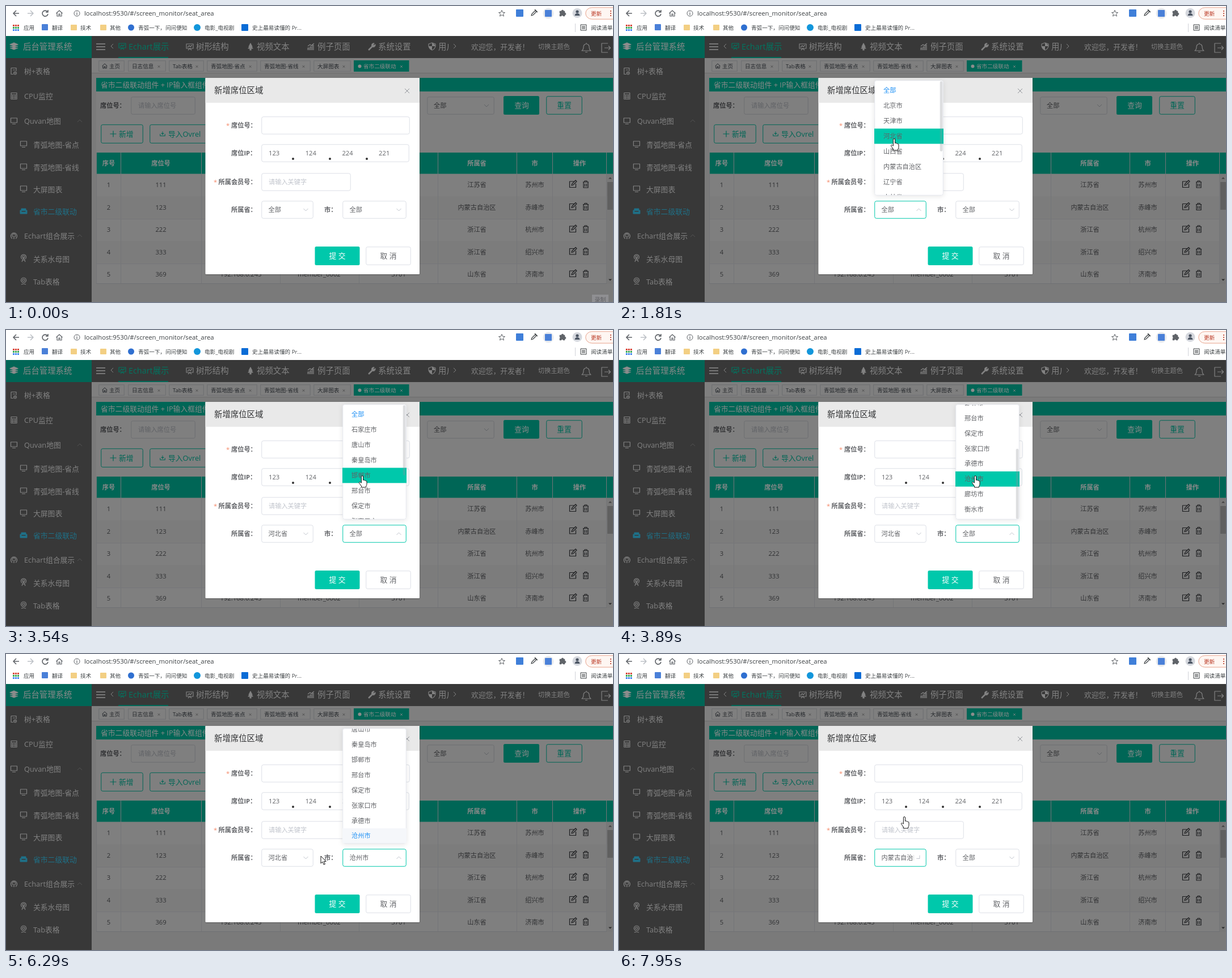
Write an HTML page that moves like this. It is 1070 px wide and 523 px high and loops after 8000 ms.

```html
<!DOCTYPE html>
<html lang="zh-CN">
<head>
<meta charset="utf-8">
<style>
  html, body { margin: 0; width: 100%; height: 100%; overflow: hidden; background: #fff; }
  svg { display: block; width: 100vw; height: 100vh; }
  text { font-family: 'Open Sans', 'Noto Sans CJK SC', 'Noto Sans CJK', sans-serif; white-space: pre; }
</style>
</head>
<body>
<svg viewBox="0 0 1070 523" xmlns="http://www.w3.org/2000/svg">
  <defs>
    <clipPath id="cutNav"><path d="M740 53h40v40h-40z"/></clipPath>
    <clipPath id="cutTable"><path d="M159 259h911v232H159z"/></clipPath>
    <clipPath id="cutValue"><path d="M450 344h69.5v32h-69.5z"/></clipPath>
    <clipPath id="cutList"><path d="M440 132h280v202H440z"/></clipPath>
    <filter id="shadow" x="-20%" y="-20%" width="140%" height="140%">
      <feDropShadow dx="0" dy="1.5" stdDeviation="4" flood-opacity=".1"/>
    </filter>
    <filter id="dialogShadow">
      <feDropShadow dx="0" dy=".8" stdDeviation="1.2" flood-opacity=".3"/>
    </filter>
  </defs>
  <g id="page"></g>
  <g id="live"></g>
</svg>
<script>
const TEAL = '#00c8ab', DIM_TEAL = '#006656', DIM_WHITE = '#7f7f7f', DARK = '#383838',
      INK = '#606266', DIM_INK = '#303133', LINE = '#dcdfe6', DIM_LINE = '#6e6f72';

// Markup helpers
const rect = (x, y, x2, y2, fill, stroke = 'none', r = 0) => {
  const o = stroke === 'none' ? 0 : .75;
  return `<rect x="${x + o}" y="${y + o}" width="${x2 - x - 2 * o}" height="${y2 - y - 2 * o}" rx="${r}" fill="${fill}" stroke="${stroke}"/>`;
};
const text = (x, y, s, size = 11.2, fill = INK, extra = '') =>
  `<text x="${x}" y="${y + size * .37}" font-size="${size}" fill="${fill}" ${extra}>${s}</text>`;
const MID = 'text-anchor="middle" ', BOLD = 'font-weight="700"';
const path = (d, stroke, x = 0, y = 0, width = 1.2, fill = 'none', extra = '') =>
  `<path d="${d}" transform="translate(${x} ${y}) ${extra}" fill="${fill}" stroke="${stroke}" stroke-width="${width}" stroke-linejoin="round"/>`;
const dot = (x, y, r, fill, stroke = 'none') => `<circle cx="${x}" cy="${y}" r="${r}" fill="${fill}" stroke="${stroke}"/>`;
const chevron = (x, y, angle, color) => path('M-4 2L0-2L4 2', color, x, y, 1, 'none', `rotate(${angle})`);
const cross = (x, y, r, color, w = 1) => path(`M${-r} ${-r}L${r} ${r}M${r} ${-r}L${-r} ${r}`, color, x, y, w);

const ICON = {
  screen: 'M-5.5-5h11v8h-11zM-3 5.5h6',
  chart: 'M-6-5h12v8H-6zM-3 6L0 3L3 6M-4 1L-1-2L1 0L4-3',
  tree: 'M-1 6V3H-4L-1 0H-3L0-6L3 0H1L4 3H1V6z',
  bars: 'M-6 6V2h2v4M-2 6V0h2v6M2 6V-3h2v9M-6-1L-2-4L0-2L5-6',
  wrench: 'M-5 6L-6 5L0-1A3.5 3.5 0 0 1 4-6L2-3.5L3.5-2L6-4A3.5 3.5 0 0 1 1 0z',
  shield: 'M0-6L6-4V0Q5 5 0 7Q-5 5-6 0V-4z',
  doc: 'M-5-5.5H4V0M-5-5.5V5.5H-1M-2-2H2M2 1a2.5 2.5 0 1 0 .1 0zM2 2v2h1',
  grid: 'M-5-5.5H5V5.5H-5zM-5-2H5M-5 2H5M-2-2V5M2-2V5',
  radar: 'M-3 5a5.5 5.5 0 1 1 6 0M-1.8 2a3 3 0 1 1 3.6 0M0 0V5M-1 5h2',
  antenna: 'M-3 1a4.5 4.5 0 1 1 6 0M-1-1a2 2 0 1 1 2 0M0-2L-3 6M0-2L3 6M-1.5 3h3',
  webcam: 'M0-6a4.5 4.5 0 1 0 .1 0zM0-3.5a2 2 0 1 0 .1 0zM-4 6Q0 4 4 6',
  home: 'M-5.5 0L0-5L5.5 0M-4-1V5H-1V1H1V5H4V-1',
  edit: 'M3-5H-5.5V5.5H5.5V-1M-2 2L-1-1L5-7L7-5L1 1z',
  trash: 'M-5-4H5M-2-4V-6H2V-4M-4-4V6H4V-4M-1.5-1V4M1.5-1V4',
  download: 'M-5 0V4H5V0M0-5V1M-2.5-1.5L0 1L2.5-1.5',
  bell: 'M-8 5H8Q5 3 5-2A5 5 0 0 0-5-2Q-5 3-8 5zM-2 7.5H2M0-7V-9',
  exit: 'M4-8H-7V8H4M-2 0H8M5-3.5L8.5 0L5 3.5'
};
const icon = (name, x, y, color, fill = 'none', scale = 1) => path(ICON[name], color, x, y, 1.2, fill, `scale(${scale})`);

function browserBar() {
  const g = '#5f6368', b = '#2f6fd0', mark = '#3c4043';
  let s = rect(0, 0, 1070, 53, '#fff');
  s += path('M5 0H-5M0-5L-5 0L0 5', g, 18, 13, 1.6) + path('M-5 0H5M0-5L5 0L0 5', '#bdc1c6', 43, 13, 1.6);
  s += path('M4-3A5 5 0 1 0 5 1M5-6V-2H1', g, 69, 13, 1.6) + icon('home', 94, 13, g);
  s += dot(125, 13, 5, 'none', g) + path('M0-1V3M0-3.2V-2', g, 125, 13);
  s += text(138, 12.5, 'localhost:9530/#/screen_monitor/seat_area', 11.3, mark);
  s += path('M0-5.5L1.6-1.7L5.5-1.5L2.5 1L3.5 5L0 2.8L-3.5 5L-2.5 1L-5.5-1.5L-1.6-1.7z', g, 874, 13, 1);
  s += rect(899, 6, 912, 19, '#3f7fd9', 'none', 1) + path('M-5 5L-4 2L2-4L4-2L-2 4zM1-6L6-1', mark, 931, 12, 1.2);
  s += dot(956, 13, 9.5, '#e8eaed') + rect(950, 7, 962, 19, '#4a80d8', 'none', 1);
  s += path('M-5-3H-2A2 2 0 0 1 2-3H4V0A2 2 0 0 1 4 4V6H1A1.5 1.5 0 0 0-2 6H-5V3A2 2 0 0 0-5 0z', g, 981, 12, .5, g);
  s += dot(1007, 12.5, 8.5, '#d5d8de') + dot(1007, 10, 2.6, '#4b5563') + path('M-4.5 5Q-4 1 0 1T4.5 5z', 'none', 1007, 12, 0, '#4b5563');
  s += rect(1021, 2, 1090, 24, '#fef6f2', '#e8a48e', 11) + text(1031, 13, '更新', 9.6, '#b8341f');
  for (let i = 0; i < 3; i++) s += dot(1066, 9 + 4 * i, 1.1, '#b8341f');
  ['#d94b3f', '#36a852', '#4285f4'].forEach((c, j) => {
    for (let i = 0; i < 3; i++) s += rect(12 + 4 * i, 33 + 4 * j, 15 + 4 * i, 36 + 4 * j, c);
  });
  s += rect(63, 32, 74, 43, '#4a80d8', 'none', 1);
  for (const x of [114, 166]) s += rect(x, 33, x + 11, 43, '#f3cf83', 'none', 1);
  s += dot(220.5, 38, 5.5, b) + dot(337, 38, 6, '#1296db') + rect(415, 32, 427, 44, '#0a6cd6', 'none', 1);
  [[31, '应用'], [81, '翻译'], [131, '技术'], [183, '其他'], [233, '青弧一下，问问便知'], [350, '电影_电视剧'],
   [434, '史上最易读懂的 Pr...'], [1031, '阅读清单']].forEach(([x, label]) => s += text(x, 38, label, 9.6, mark));
  return s + rect(1003, 31, 1004, 46, '#d0d3d8') + path('M-5-5H5V5H-5zM-3-2H3M-3 0H3M-3 2H3', mark, 1018, 38, 1);
}

function sidebar() {
  const c = '#828282', active = '#1f7188';
  let s = rect(0, 53, 151, 523, DARK) + rect(0, 53, 151, 92, DIM_TEAL);
  s += path('M-7-3L0-6L7-3L0 0zM-7 0L0 3L7 0M-7 3L0 6L7 3', '#8c8c8c', 14, 71, 1.3, '#8c8c8c');
  s += text(30, 72, '后台管理系统', 14.4, '#8a8a8a');
  [[115, '树+表格', 'doc'], [159, 'CPU监控', 'grid'], [203, 'Quvan地图', 'screen', 1], [406, 'Echart组合展示', 'radar', 1]]
    .forEach(([y, label, name, caret]) => {
      s += icon(name, 14, y, c) + text(32, y, label, 12.8, c);
      if (caret) s += chevron(130, y, 0, '#525252');
    });
  [[245, '青弧地图-省点', 'screen'], [285, '青弧地图-省线', 'screen'], [324, '大屏图表', 'screen'],
   [447, '关系水母图', 'antenna'], [487, 'Tab表格', 'webcam']]
    .forEach(([y, label, name]) => s += icon(name, 31, y - 1, c) + text(48, y, label, 12.8, c));
  s += path('M-4-1V-5H4V-1M-6-2V4H6V-2H4V1H-4V-2z', active, 31, 363, 1, active);
  return s + text(48, 363, '省市二级联动', 12.8, active);
}

function topBar() {
  const c = '#828282', active = '#007561';
  let s = rect(151, 53, 1070, 92, DARK) + rect(198, 90, 286, 92, DIM_TEAL);
  s += path('M159 67H175M159 72H175M159 77H175', '#8c8c8c', 0, 0, 1.6);
  s += chevron(187, 71, -90, c) + chevron(791, 71, 90, c);
  s += icon('chart', 205, 71, active) + text(216, 72, 'Echart展示', 14.4, active);
  [[324, '树形结构', 'chart'], [431, '视频文本', 'tree', c], [538, '例子页面', 'bars'], [645, '系统设置', 'wrench', c]]
    .forEach(([x, label, name, fill]) => s += icon(name, x, 72, c, fill) + text(x + 11, 72, label, 14.4, c));
  s += icon('shield', 751, 71, c) + path('M0-6V0H6Q5-4 0-6M0 0V7Q-5 5-6 0z', 'none', 751, 71, 0, c);
  s += `<g clip-path="url(#cutNav)">${text(762, 72, '用户', 14.4, c)}</g>`;
  s += text(820, 72, '欢迎您，开发者！', 12.8, c) + text(938, 72, '切换主题色', 11.2, c);
  return s + icon('bell', 1023, 74, c) + icon('exit', 1057, 74, c);
}

function tabs() {
  let s = rect(151, 92, 1070, 118, DIM_WHITE) + rect(151, 118, 1070, 119, '#6c6c6c');
  s += rect(163, 96, 209, 116, DIM_WHITE, DIM_LINE) + icon('home', 174, 106, '#25282c', 'none', .8) + text(182, 106, '主页', 9.6, '#25282c');
  [[215, 282, '日志信息'], [287, 349, 'Tab表格'], [354, 443, '青弧地图-省点'], [448, 537, '青弧地图-省线'], [542, 608, '大屏图表']]
    .forEach(([a, b, label]) => s += rect(a, 96, b, 116, DIM_WHITE, DIM_LINE) + text(a + 7, 106, label, 9.6, '#25282c') + cross(b - 12.5, 107, 1.8, '#444', .8));
  return s + rect(613, 96, 710.5, 116, DIM_TEAL) + dot(623.5, 106.5, 3, '#8c8c8c') + text(630, 106, '省市二级联动', 9.6, '#8c8c8c') + cross(697, 107, 1.8, '#8c8c8c', .8);
}

function content() {
  const cols = [159, 202, 344, 483, 622, 761, 900, 963, 1058];
  const rows = [['111', '江苏省', '苏州市'], ['123', '内蒙古自治区', '赤峰市'], ['222', '浙江省', '杭州市'], ['333', '浙江省', '绍兴市'], ['369', '山东省', '济南市']];
  const outlined = (a, y, b, y2) => rect(a, y, b, y2, DIM_WHITE, DIM_TEAL, 2.5);
  const dimText = (x, y, s, extra = MID) => text(x, y, s, 11.2, DIM_INK, extra);
  let s = rect(151, 119, 1070, 523, '#7a7a7a') + rect(159, 127, 1070, 491, DIM_WHITE) + rect(159, 127, 1070, 151, DIM_TEAL);
  s += text(167, 139, '省市二级联动组件 + IP输入框组件', 12.8, '#8a8a8a') + dimText(166, 176, '席位号：', BOLD);
  s += rect(220, 160, 334, 192, DIM_WHITE, DIM_LINE, 2.5) + text(233, 176, '请输入席位号', 11.2, '#606266');
  s += rect(742, 160, 861, 192, DIM_WHITE, DIM_LINE, 2.5) + dimText(754, 176, '全部', '') + chevron(847, 176, 180, '#606266');
  s += rect(877, 159, 940, 192, DIM_TEAL, 'none', 2.5) + text(909, 175, '查询', 12.8, '#8a8a8a', MID);
  s += outlined(952, 159, 1016, 192) + text(984, 175, '重置', 12.8, DIM_TEAL, MID);
  s += outlined(167, 209, 242, 243) + path('M-5.5 0H5.5M0-5.5V5.5', DIM_TEAL, 189, 226) + text(199, 226, '新增', 12.8, DIM_TEAL);
  s += outlined(253, 209, 360, 243) + icon('download', 276, 226, DIM_TEAL, 'none', .85) + text(286, 226, '导入Ovrel', 12.8, DIM_TEAL);

  s += rect(159, 259, 1070, 296.5, DIM_TEAL);
  [[181, '序号'], [273, '席位号'], [830, '所属省'], [932, '市'], [1011, '操作']]
    .forEach(([x, label]) => s += text(x, 278, label, 11.2, '#8a8a8a', MID + BOLD));
  let body = '';
  rows.forEach(([seat, province, city], i) => {
    const y = 316 + 39.5 * i;
    if (i % 2) body += rect(159, y - 19.5, 1058, y + 20, '#7c7c7c');
    body += rect(159, Math.round(y + 20), 1058, Math.round(y + 21), '#747578');
    body += dimText(181, y, i + 1) + dimText(273, y, seat) + dimText(830, y, province) + dimText(932, y, city);
    body += icon('edit', 999, y - 1, '#1c1d1f') + icon('trash', 1022, y - 1, '#1c1d1f');
  });
  body += dimText(414, 474, '192.168.0.245') + dimText(552, 474, 'member_0002') + dimText(692, 474, '3701');
  cols.forEach(x => body += rect(x, 259, x + 1, 491, '#747578'));
  s += `<g clip-path="url(#cutTable)">${body}</g>`;
  s += rect(159, 490, 1070, 491, '#6f7073') + rect(1059, 297, 1070, 491, '#787878') + rect(1060, 311, 1070, 360, '#606060');
  return s + path('M-3 1.5L0-1.5L3 1.5z', 'none', 1065, 304, 0, '#404040') + path('M-3-1.5L0 1.5L3-1.5z', 'none', 1065, 484, 0, '#282828');
}

function dialog() {
  const label = (x, y, s, star) => text(x, y, s, 11.2, INK, BOLD) + (star ? text(star, y, '*', 11.2, '#f58c6c') : '');
  let s = `<g filter="url(#dialogShadow)">${rect(351.5, 127, 729, 474, '#fff', 'none', 1.5)}</g>` + rect(351.5, 127, 729, 171, '#e9e9e9');
  s += text(367, 149, '新增席位区域', 14.4, '#303133');
  s += label(397, 211, '席位号：', 388) + label(397, 260, '席位IP：') + label(374.5, 311, '所属会员号：', 366) + label(397, 360, '所属省：') + label(561, 360, '市：');
  s += rect(450, 195, 712, 227, '#fff', LINE, 3) + rect(450, 295, 608, 327, '#fff', LINE, 3) + text(463, 311, '请输入关键字', 11.2, '#c0c4cc');
  s += rect(544.5, 425, 623.5, 458, TEAL, 'none', 2.5) + text(584, 441.5, '提 交', 12.8, '#fff', MID);
  return s + rect(634, 425, 714, 458, '#fff', LINE, 2.5) + text(674, 441.5, '取 消', 12.8, INK, MID);
}

// Motion
const PROVINCES = ['全部', '北京市', '天津市', '河北省', '山西省', '内蒙古自治区', '辽宁省', '吉林省', '黑龙江省'];
const CITIES = ['全部', '石家庄市', '唐山市', '秦皇岛市', '邯郸市', '邢台市', '保定市', '张家口市', '承德市', '沧州市', '廊坊市', '衡水市'];
const ROW = 26.87, LIST_TOP = 136;
const CURSOR = [[70, 1050, 506], [770, 492, 355], [840, 488, 351], [1260, 488, 351], [1740, 484, 235], [2150, 484, 235],
  [2570, 622, 362], [2900, 622, 362], [3540, 627, 258], [4500, 627, 258], [4910, 639, 317], [5170, 680, 371], [5440, 680, 358],
  [5900, 680, 358], [6290, 555, 357], [6420, 528, 357], [6900, 528, 357], [7600, 502, 288], [8000, 502, 288]];
const HAND = 'M-.6 12V1.2a1.6 1.6 0 0 1 3.2 0V7.5l1-.6q1.2-.2 1.6 1 1.4-.6 2 .8 1.6-.4 1.8 1.2v4.6q0 2-1.4 3.6V20h-8v-2l-4-5.6q-.6-1.6 1-1.8 1 0 2.2 1.4z';
const ARROW = 'M0 0V13l3-2.8 2.2 5 2.2-1-2.2-4.8H9.2z';

const ramp = (t, start, length) => Math.min(1, Math.max(0, (t - start) / length));
const smooth = p => p * p * (3 - 2 * p);
const between = (t, a, b) => t >= a && t < b;
const openness = (t, spans) => Math.max(...spans.map(([a, b]) => ramp(t, a, 280) - ramp(t, b, 280)));

function cursorAt(t) {
  const i = Math.max(1, CURSOR.findIndex(k => k[0] > t));
  const [a, b] = [CURSOR[i - 1], CURSOR[i]];
  const p = smooth(ramp(t, a[0], b[0] - a[0]));
  return { x: a[1] + (b[1] - a[1]) * p, y: a[2] + (b[2] - a[2]) * p };
}

function field({ left, right, value, border, open }) {
  return rect(left, 344, right, 376, '#fff', border, 3) +
    `<g ${left < 500 ? 'clip-path="url(#cutValue)"' : ''}>${text(left + 12.5, 360, value)}</g>` +
    chevron(right - 13.5, 360, 180 * (1 - open), '#c0c4cc');
}

const inList = (c, left, right) => c.x >= left && c.x <= right && c.y > 131 && c.y < 335;

function popup({ left, listRight, items, selected, scroll, open }, cursor) {
  const shown = ramp(open, .25, .75);
  if (!shown) return '';
  const over = inList(cursor, left, listRight);
  const hover = over ? Math.floor((cursor.y - LIST_TOP + scroll) / ROW) : selected;
  let rows = '';
  items.forEach((item, i) => {
    const y = LIST_TOP + i * ROW - scroll;
    if (i === hover) rows += rect(left, y, listRight, y + ROW, over ? TEAL : '#f5f7fa');
    rows += text(left + 16, y + 13.3, item, 11.2, i === selected ? '#1e90f5' : INK);
  });
  if (over) rows += rect(listRight - 6.3, 133 + scroll * .6, listRight - 1.6, 257 + scroll * .6, 'rgba(144,147,153,.3)', 'none', 2.4);
  const squash = .4 + .6 * shown;
  return `<g opacity="${shown}" transform="translate(0 ${335 * (1 - squash)}) scale(1 ${squash})">
    <g filter="url(#shadow)">${rect(left, 131, listRight, 335, '#fff', '#e4e7ed', 3)}</g><g clip-path="url(#cutList)">${rows}</g></g>`;
}

function scene(t) {
  const cursor = cursorAt(t);
  const province = {
    left: 450, right: 542, listRight: 572, items: PROVINCES, scroll: 0,
    selected: t < 2010 ? 0 : t < 7740 ? 3 : 5,
    open: openness(t, [[910, 2010], [6760, 7740]]),
    border: between(t, 910, 2640) || t >= 6760 ? TEAL : between(t, 770, 910) || t >= 6490 ? '#c0c4cc' : LINE
  };
  const city = {
    left: 593, right: 706, listRight: 706, items: CITIES,
    selected: between(t, 4430, 7740) ? 9 : 0,
    scroll: t < 5200 ? 128 * smooth(ramp(t, 3600, 290)) : 69.8,
    open: openness(t, [[2640, 4430], [5660, 6760]]),
    border: between(t, 2640, 6760) ? TEAL : LINE
  };
  for (const f of [province, city]) f.value = f.items[f.selected];

  let s = cross(707, 150, 4, between(t, 4500, 5700) ? '#4fb5a8' : '#909399');
  s += rect(450, 244, 711, 276, '#fff', between(t, 4600, 4980) ? '#b4b8c0' : LINE, 3);
  [123, 124, 224, 221].forEach((n, i) => {
    s += text(463 + 64.7 * i, 260, n);
    if (i < 3) s += dot(506 + 65 * i, 270, 2, '#333');
  });
  s += field(province) + field(city) + popup(province, cursor) + popup(city, cursor);

  if (t < 70) return s + rect(1033, 510, 1062, 523, '#8f8f92') + text(1047.5, 519, '录制', 10, '#5e5e62', MID);
  const pointing = [province, city].some(f =>
    between(cursor.x, f.left, f.right) && between(cursor.y, 344, 377) || f.open > 0 && inList(cursor, f.left, f.listRight));
  return s + path(pointing ? HAND : ARROW, '#111', cursor.x, cursor.y, 1, '#fff');
}

document.getElementById('page').innerHTML = browserBar() + content() + topBar() + tabs() + sidebar() + dialog();
const live = document.getElementById('live');
function tick() {
  live.innerHTML = scene(performance.now() % 8000);
  requestAnimationFrame(tick);
}
tick();
</script>
</body>
</html>
```
